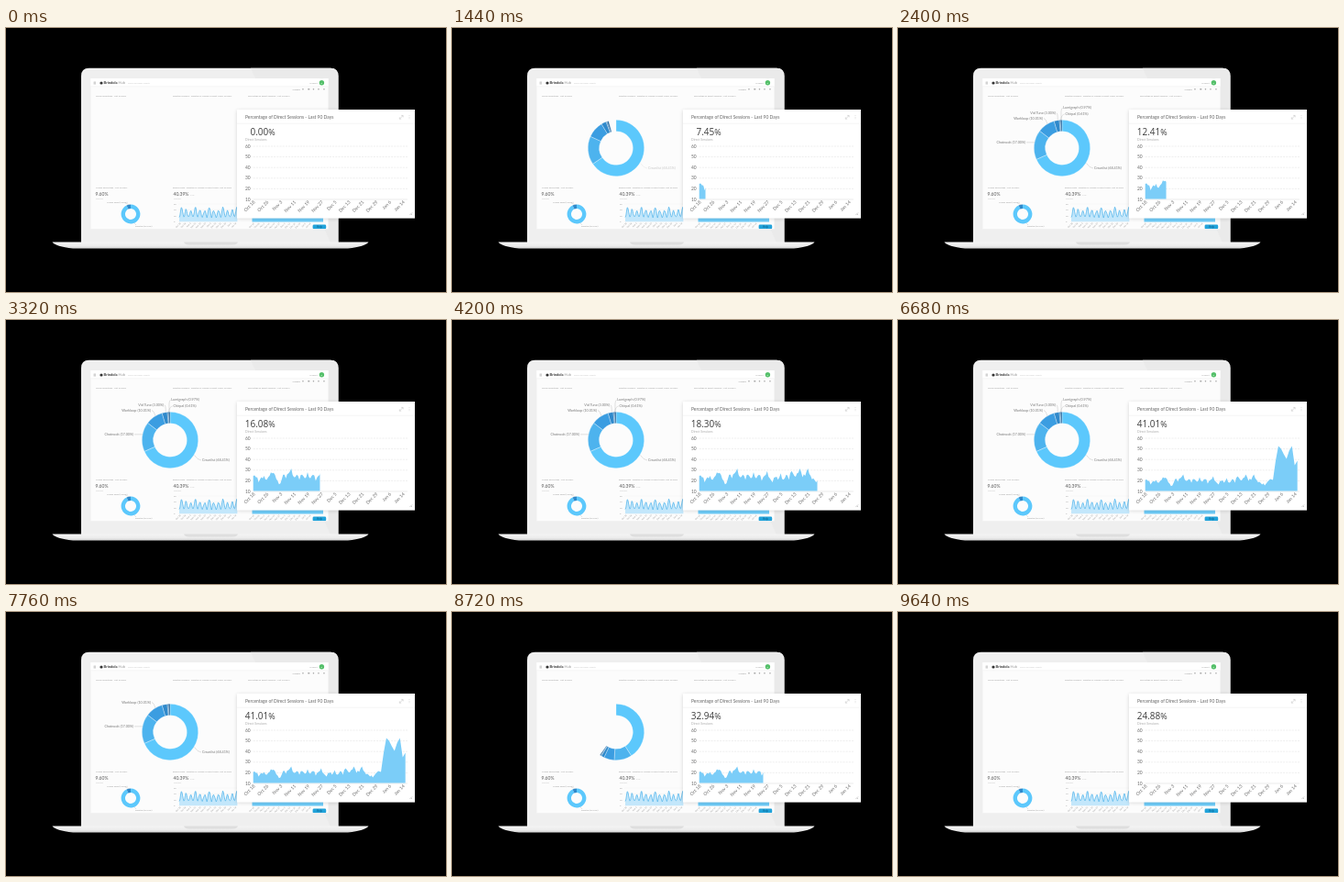
An HTML page for the animation above (9680 ms loop, 480 px wide and 288 px high).

```html
<!DOCTYPE html>
<html lang="en">
<head>
<meta charset="utf-8">
<title>Dashboard</title>
<style>
html, body { margin: 0; width: 100%; height: 100%; overflow: hidden; background: #000; }
svg { display: block; width: 100%; height: 100%; }
text { font-family: Lato, "Open Sans", sans-serif; }
.tiny { font-size: 2.35px; fill: #999; }
.faint { font-size: 2.2px; fill: #c4c4c4; }
.tick { font-size: 4.9px; fill: #666; }
.label { font-size: 3.75px; fill: #777; }
.value { font-size: 5px; fill: #555; }
</style>
</head>
<body>
<svg viewBox="0 0 480 288">
  <defs>
    <linearGradient id="base" x2="0" y2="1">
      <stop offset="0" stop-color="#f4f4f4"/><stop offset=".6" stop-color="#ececec"/><stop offset="1" stop-color="#d2d2d2"/>
    </linearGradient>
    <clipPath id="wipe"><rect id="wipeBox" x="269" y="120" height="70" width="0"/></clipPath>
    <clipPath id="screen"><rect x="92.4" y="55" width="259.2" height="164.3"/></clipPath>
    <filter id="soft" x="-10%" y="-10%" width="120%" height="120%"><feGaussianBlur stdDeviation="2"/></filter>
  </defs>

  <rect width="480" height="288"/>
  <path d="M82 234V52.5Q82 43.8 90.5 43.8H354Q362.5 43.8 362.5 52.5V234Z" fill="#efefef"/>
  <path d="M267 43.8H354Q362.5 43.8 362.5 52.5V234H354Z" fill="#eaeaea"/>
  <path d="M50.5 233.5H395.5Q392 238.6 373 240.4H73Q54 238.6 50.5 233.5Z" fill="url(#base)"/>
  <path d="M194 233.5H253Q252 236.4 248 236.4H199Q195 236.4 194 233.5Z" fill="#dedede"/>

  <g clip-path="url(#screen)">
    <rect x="92" y="55" width="260" height="165" fill="#fcfcfc"/>
    <rect x="92" y="55" width="260" height="8.5" fill="#fff"/>
    <path d="M92 63.7H352" stroke="#f3f3f3" stroke-width=".6" fill="none"/>
    <path d="M95.6 59H98M95.6 60H98M95.6 61H98" stroke="#999" stroke-width=".5"/>
    <circle cx="104" cy="60" r="1.6" fill="#333"/>
    <text x="106.6" y="61.4" font-size="4" font-weight="700" fill="#333">Brindola<tspan font-weight="400" fill="#999"> Hub</tspan></text>
    <text class="faint" x="133" y="60.8">Search for pages, reports</text>
    <text class="tiny" x="331" y="60.8">Account</text>
    <circle cx="344.4" cy="59.8" r="2.7" fill="#55c06a"/>
    <text x="344.4" y="60.7" font-size="2.5" fill="#e4f6e8" text-anchor="middle">B</text>
    <text class="tiny" x="312.5" y="67.8">Widgets</text>
    <g id="tools" fill="#aaa"></g>
    <g id="heads"></g>

    <g id="donut"></g>
    <g id="labels"></g>

    <text class="value" x="97.5" y="183.3">9.60%</text>
    <text class="faint" x="98" y="186.8">Sessions</text>
    <g id="small"></g>
    <text class="tiny" x="110" y="190.8">Mobile Direct (3.60%)</text>
    <text class="tiny" x="141" y="217">Desktop (96.40%)</text>
    <path d="M130 191L134.5 192.8M142 215L140 212.8" stroke="#aaa" stroke-width=".3" fill="none"/>

    <text class="value" x="182.5" y="183.3">40.39%</text>
    <text class="faint" x="198.5" y="183">&#8593; 1.5%</text>
    <text class="faint" x="183" y="186.8">Sessions</text>
    <g id="mini"></g>
    <rect x="268.5" y="196" width="77.5" height="15.5" fill="#6ecbf8"/>
    <g id="miniTicks"></g>
    <rect x="334.6" y="214.6" width="14.6" height="4.7" rx="1.4" fill="#22a3da"/>
    <text x="342" y="218" font-size="2.8" fill="#0d5f88" text-anchor="middle">Help</text>
  </g>

  <rect x="252" y="90" width="111" height="118" fill="#000" opacity=".16" filter="url(#soft)"/>
  <rect x="252" y="89" width="194" height="118.6" fill="#fff"/>
  <path d="M252 104.2H446" stroke="#f3f3f3" stroke-width=".7"/>
  <text x="261" y="99.2" font-size="4.95" fill="#666">Percentage of Direct Sessions - Last 90 Days</text>
  <path d="M429.5 99L433 95.6M431.2 95.4H433.2V97.4M429.3 97.3V99.2H431.2" stroke="#bbb" stroke-width=".5" fill="none"/>
  <g fill="#aaa"><circle cx="440" cy="95.6" r=".4"/><circle cx="440" cy="97.2" r=".4"/><circle cx="440" cy="98.8" r=".4"/></g>
  <path d="M440.5 204L443 201.5M442 204L443 203" stroke="#999" stroke-width=".5"/>
  <text y="117.4" x="293.7" text-anchor="end" style="font-family:'Open Sans',sans-serif" font-size="10" fill="#3c3c3c"><tspan id="num">0.00</tspan><tspan font-size="9">%</tspan></text>
  <text x="261" y="122.6" font-size="3.5" fill="#aaa">Direct Sessions</text>
  <g id="axes"></g>
  <g clip-path="url(#wipe)"><path id="area" fill="#7bcdf8"/></g>
</svg>
<script>
const LOOP = 9680, AXIS = 187, BASE = 186.4, LEFT = 269.7, WIDTH = 166;
const CX = 179, CY = 131;
const $ = id => document.getElementById(id);

function add(parent, tag, attrs, text) {
  const el = document.createElementNS("http://www.w3.org/2000/svg", tag);
  for (const k in attrs) el.setAttribute(k, attrs[k]);
  if (text) el.textContent = text;
  return parent.appendChild(el);
}

const clamp = v => Math.max(0, Math.min(1, v));
const smooth = v => { v = clamp(v); return v * v * (3 - 2 * v); };

// Linear interpolation through [time, value] pairs.
function track(keys, t) {
  for (let i = 1; i < keys.length; i++) {
    const [a, u] = keys[i - 1], [b, v] = keys[i];
    if (t <= b) return u + (v - u) * clamp((t - a) / (b - a));
  }
  return keys[keys.length - 1][1];
}

// Ring slice between two turns (0..1), clockwise from the top.
function slice(cx, cy, R, r, from, to) {
  if (to - from < 1e-4) return "";
  const at = (rad, turn) => {
    const a = turn * 2 * Math.PI;
    return (cx + rad * Math.sin(a)).toFixed(2) + " " + (cy - rad * Math.cos(a)).toFixed(2);
  };
  const big = to - from > 0.5 ? 1 : 0;
  return `M${at(R, from)}A${R} ${R} 0 ${big} 1 ${at(R, to)}L${at(r, to)}A${r} ${r} 0 ${big} 0 ${at(r, from)}Z`;
}

// Share, colour, label, text x, text y, anchor, leader, fade-in time, fade-out time
const parts = [
  [68.41, "#5cc8fc", "Cravelist", 214, 154.3, "start", "M205.5 147.5Q209 152.8 213 153", 1390, 8150],
  [17.00, "#4db3ee", "Chatnook", 139, 125.8, "end", "M149 124.8H140", 1540, 8000],
  [10.01, "#3b9de1", "Workloop", 158, 99.8, "end", "M163 105Q161 98.6 159 98.6", 1700, 7850],
  [3.00, "#2f89cb", "Vid Tune", 172, 93.8, "end", "M174.2 100.6Q174.5 93 172.7 92.6", 1860, 7560],
  [0.61, "#2776b4", "Chirpal", 182.5, 95.3, "start", "M177.3 100.4Q178.5 94.2 181.8 94", 1980, 7420],
  [0.97, "#1f659e", "Lumigraph", 180.3, 88.3, "start", "M178.4 100.4Q177 88 179.7 87", 2100, 7280]
].map(([share, fill, name, x, y, anchor, lead, on, off]) => {
  const g = add($("labels"), "g", {});
  add(g, "path", { d: lead, fill: "none", stroke: "#aaa", "stroke-width": 0.35 });
  add(g, "text", { x, y, class: "label", "text-anchor": anchor }, `${name} (${share.toFixed(2)}%)`);
  const ring = add($("donut"), "path", { fill, stroke: "#fff", "stroke-width": 0.3 });
  return { share: share / 100, ring, g, on, off };
});

const heights = [
  12, 11, 7, 11, 12, 9, 12, 14, 13, 8, 6, 13, 10, 14, 18, 11, 13, 9, 13, 10,
  15, 10, 13, 8, 12, 16, 10, 7, 11, 9, 14, 9, 13, 9, 16, 12, 14, 18, 11, 12,
  18, 12, 10, 7, 6, 10, 13, 12, 33, 49, 46, 40, 35, 44, 49, 28, 33
];

// Daily ripple between the main points, faded out on the steep stretch.
function ripple(i) {
  return i < 44 ? 1.8 * Math.sin(i * 5.1) : 0;
}

function areaPath(scale) {
  const last = heights.length - 1;
  let d = `M${LEFT} ${BASE}`;
  for (let i = 0; i <= last; i += 0.5) {
    const a = heights[Math.floor(i)], b = heights[Math.ceil(i)];
    const h = (a + b) / 2 + (i % 1 ? ripple(i) : 0);
    d += `L${(LEFT + i / last * WIDTH).toFixed(2)} ${(BASE - h * scale).toFixed(2)}`;
  }
  return `${d}L${LEFT + WIDTH} ${BASE}Z`;
}

function buildStatic() {
  [324, 330, 335.5, 341, 347].forEach((x, i) =>
    add($("tools"), "rect", { x: x - 0.8, y: 66, width: i === 1 ? 2.2 : 1.5, height: 1.5, rx: 0.4 }));

  [[98, 74.6, "Social Percentage - Last 90 Days"],
   [182, 74.6, "Desktop Sessions - Desktop vs Mobile vs Tablet Users, 90 Days"],
   [264, 74.6, "Percentage of Direct Sessions - Last 90 Days"],
   [98, 175.4, "Mobile Percentage - Last 90 Days"],
   [182, 175.4, "Bounce Rate - Desktop vs Mobile vs Tablet Users, Last 90 Days"]
  ].forEach(([x, y, s]) => add($("heads"), "text", { x, y, class: "tiny" }, s));

  add($("small"), "path", { d: slice(136, 203, 10.4, 6, 0, 0.93), fill: "#5cc8fc" });
  add($("small"), "path", { d: slice(136, 203, 10.4, 6, 0.93, 0.9999), fill: "#2f89cb" });

  for (let i = 0; i < 4; i++) {
    const y = 192 + i * 6.4;
    add($("mini"), "path", { d: `M188.5 ${y}H252`, stroke: "#e8e8e8", "stroke-width": 0.3 });
    add($("mini"), "text", { x: 183, y: y + 0.8, class: "tiny" }, `${60 - i * 20}`);
  }
  let line = "";
  for (let i = 0; i <= 88; i++) {
    const peak = Math.pow(Math.abs(Math.sin(i * 0.45)), 1.8);
    const y = 206.5 - peak * (8.6 + 2.4 * Math.sin(i * 0.31)) + 0.6 * Math.sin(i * 1.7);
    line += `L${(189 + i * 0.72).toFixed(2)} ${y.toFixed(2)}`;
  }
  add($("mini"), "path", { d: `M189 211.2${line}L252.4 211.2Z`, fill: "#c3e7fb" });
  add($("mini"), "path", { d: "M" + line.slice(1), fill: "none", stroke: "#5ab8ec", "stroke-width": 0.8 });

  const days = ["Oct 18", "Oct 26", "Nov 3", "Nov 11", "Nov 19", "Nov 27", "Dec 5", "Dec 13", "Dec 21", "Dec 29", "Jan 6", "Jan 14"];
  const slanted = (parent, x, y, s, cls) =>
    add(parent, "text", { class: cls, "text-anchor": "end", transform: `translate(${x} ${y}) rotate(-45)` }, s);
  days.forEach((s, i) => {
    slanted($("axes"), 272 + i * 14.85, 190.3, s, "tick");
    slanted($("miniTicks"), 191 + i * 5.5, 213.2, s, "tiny");
    slanted($("miniTicks"), 271 + i * 5.6, 213.6, s, "tiny");
  });

  for (let i = 0; i < 6; i++) {
    const y = AXIS - i * 11.6, axis = i === 0;
    add($("axes"), "text", { x: 261, y: y + 1.6, class: "tick" }, `${10 + i * 10}`);
    add($("axes"), "path", {
      d: `M${LEFT} ${y}H438`, stroke: axis ? "#d4d4d4" : "#dcdcdc",
      "stroke-width": 0.5, "stroke-dasharray": axis ? "none" : "2 1.2"
    });
  }
}

const counter = [[40, 0], [1440, 7.44], [2400, 12.41], [3400, 16.4], [4220, 18.35], [5600, 44.05], [6400, 41.01], [7800, 41.01], [9640, 24.88]];
const reveal = [[1150, 0], [1440, 6.5], [2400, 22.5], [3000, 52], [4200, 128.5], [5600, 159], [6200, 168], [7900, 168], [9300, 0]];

function draw(t) {
  const turn = 0.9999 * (t < 5000 ? track([[200, 0], [1440, 0.957], [1560, 1]], t) : 1 - smooth((t - 8200) / 1200));
  let from = 0;
  for (const p of parts) {
    const to = from + p.share * turn;
    p.ring.setAttribute("d", slice(CX, CY, 30.7, 18.3, from, to));
    p.g.setAttribute("opacity", clamp((t - p.on) / 130) * (1 - clamp((t - p.off) / 130)));
    from = to;
  }
  const w = track(reveal, t);
  $("wipeBox").setAttribute("width", w > 0 ? w + 1 : 0);
  $("area").setAttribute("d", areaPath(1.36 - 0.36 * smooth((t - 4250) / 800)));
  $("num").textContent = track(counter, t).toFixed(2);
}

buildStatic();
const start = performance.now();
function tick() {
  draw((performance.now() - start) % LOOP);
  requestAnimationFrame(tick);
}
tick();
</script>
</body>
</html>
```
